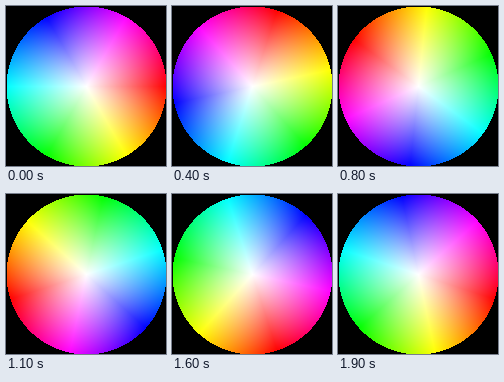
These frames come from a looping animation (160 by 160 pixels, 2 s). An HTML page with a canvas:

```html
<!DOCTYPE html>
<html lang="en">
<head>
<meta charset="utf-8">
<title>Rotating colour wheel</title>
<style>
  html, body { margin: 0; width: 100%; height: 100%; overflow: hidden; background: #000; }
  canvas { display: block; width: 160px; height: 160px; }
</style>
</head>
<body>
<canvas id="wheel" width="160" height="160"></canvas>
<script>
const SIZE = 160, RADIUS = 80, STEPS = 20, STEP_MS = 100;
const ctx = document.getElementById('wheel').getContext('2d');
const image = ctx.createImageData(SIZE, SIZE);

// One RGB channel (0-255) of a full-value HSV colour; hue in sixths of a turn.
function channel(offset, hue, saturation) {
  const k = (offset + hue) % 6;
  return 255 * (1 - saturation * Math.max(0, Math.min(k, 4 - k, 1)));
}

function drawWheel(step) {
  const turn = step / STEPS;
  for (let y = 0, i = 0; y < SIZE; y++) {
    for (let x = 0; x < SIZE; x++, i += 4) {
      const dx = x - RADIUS, dy = y - RADIUS;
      const saturation = Math.hypot(dx, dy) / RADIUS;
      const inside = saturation < 1;
      const hue = 6 * (1 + Math.atan2(dy, dx) / (2 * Math.PI) + turn);
      [5, 3, 1].forEach((offset, c) => {
        image.data[i + c] = inside ? channel(offset, hue, saturation) : 0;
      });
      image.data[i + 3] = 255;
    }
  }
  ctx.putImageData(image, 0, 0);
}

let shown = -1;
function tick() {
  const step = Math.floor(performance.now() / STEP_MS) % STEPS;
  if (step !== shown) drawWheel(shown = step);
  requestAnimationFrame(tick);
}
tick();
</script>
</body>
</html>
```
